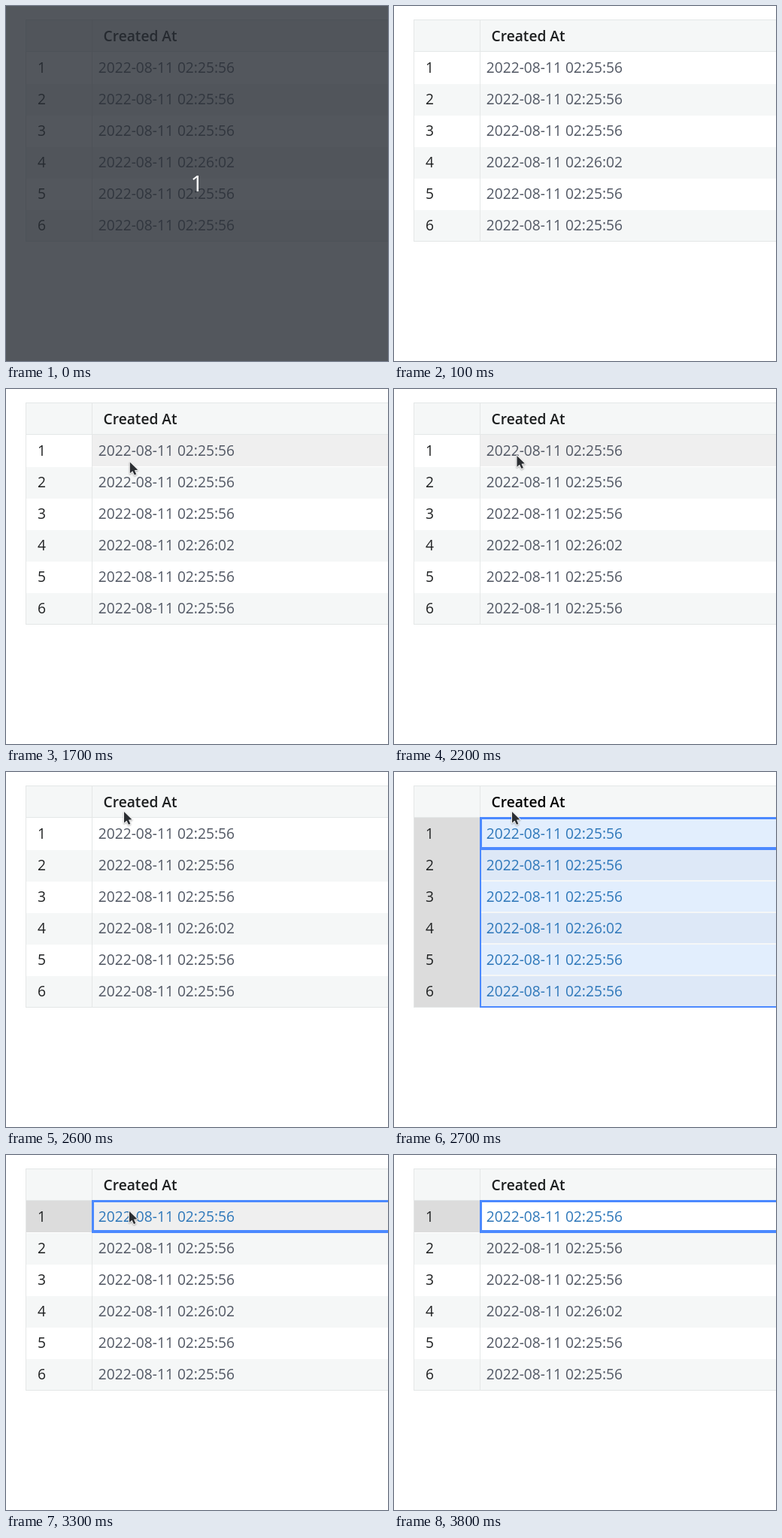
These frames come from a looping animation (508x473 px, 4200 ms). An HTML page with a canvas:

```html
<!DOCTYPE html>
<html lang="en">
<head>
<meta charset="utf-8">
<title>Column selection</title>
<style>
  html, body { margin: 0; width: 100%; height: 100%; overflow: hidden; background: #fff; }
  canvas { display: block; }
</style>
</head>
<body>
<canvas id="stage" width="508" height="473"></canvas>
<script>
const ctx = document.getElementById('stage').getContext('2d');
const W = 508, H = 473, LOOP = 4200, STEP = 100;
const LEFT = 26, COL = 114, TOP = 18, BODY = 62, ROW = 42, ROWS = 6, END = BODY + ROWS * ROW;
const FONT = '"Open Sans", "Noto Sans", sans-serif';
const LINE = '#e4e7e7', STRIPE = '#f5f7f7', BLUE = '#4b89ff';
const ENTER = 500, PICK_COLUMN = 2700, PICK_CELL = 3300, LEAVE = 3800;

// Each move glides the pointer on from where the last one ended
const moves = [
  { from: 500, to: 1000, x: 155, y: 60, pow: 0.5 },
  { from: 1300, to: 1900, x: 171, y: 121, pow: 1.2 },
  { from: 2100, to: 2300, x: 156, y: 57 },
  { from: 2400, to: 2600, x: 157, y: 53 },
  { from: 2700, to: 2800, x: 172, y: 90 },
  { from: 2900, to: 3100, x: 164, y: 75 },
  { from: 3400, to: 3700, x: 192, y: 8 }
];
const arrow = new Path2D('M0 0V14.8L3.5 11.7L6 17L8.4 15.9L6 10.8L10.4 10.3Z');

function pointerAt(t) {
  if (t < ENTER || t >= LEAVE) return null;
  let x = 426, y = 72;
  for (const m of moves) {
    const k = Math.min(1, Math.max(0, (t - m.from) / (m.to - m.from))) ** (m.pow || 1);
    x += (m.x - x) * k;
    y += (m.y - y) * k;
  }
  return { x, y };
}

function box(x, y, w, h, color) {
  ctx.fillStyle = color;
  ctx.fillRect(x, y, w, h);
}

function text(str, x, y, color, weight = 400, size = 19.2) {
  ctx.font = `${weight} ${size}px ${FONT}`;
  ctx.fillStyle = color;
  ctx.fillText(str, x, y);
}

function drawTable(hover, mode) {
  const column = mode === 'column';
  box(0, 0, W, H, '#fff');
  box(LEFT, TOP, W, BODY - TOP - 1, STRIPE);
  for (let i = 0; i < ROWS; i++) {
    const y = BODY + i * ROW, odd = i % 2;
    const chosen = column || (mode === 'cell' && i === 0);
    if (odd) box(LEFT, y, W, ROW, STRIPE);
    if (chosen) box(LEFT, y - 1, COL - LEFT, ROW, '#dcdcdc');
    if (column) box(COL, y, W, ROW, odd ? '#dde8f7' : '#e2eefd');
    if (hover === i) box(COL + 1, y - 1, W, ROW, 'rgba(0,0,0,.062)');
    if (column && i < ROWS - 1) {
      box(LEFT, y + ROW - 1, COL - LEFT, 1, '#e8eaea');
      box(COL, y + ROW - 2, W, 2, STRIPE);
    }
    text(i + 1, 42, y + 27, '#202223');
    text(`2022-08-11 02:${i === 3 ? '26:02' : '25:56'}`, 122.8, y + 27, chosen ? '#2f78ba' : '#535965');
  }
  for (const y of [TOP, BODY - 2, END - 1]) box(LEFT, y, W, 1, LINE);
  for (const x of [LEFT, COL]) box(x, TOP, 1, END - TOP, LINE);
  text('Created At', 129.6, 47, column ? '#000' : '#1d1f20', 600);

  if (column) {
    box(COL, 60, 2, END - 60, BLUE);
    box(COL, END - 2, W, 2, BLUE);
  }
  if (mode) {
    box(COL, 60, W, 3, BLUE);
    box(COL, 60, 3, 44, BLUE);
    box(COL, 100, W, 4, BLUE);
  }
}

function drawPointer({ x, y }) {
  ctx.save();
  ctx.translate(x, y);
  ctx.lineJoin = 'round';
  ctx.lineWidth = 2;
  ctx.strokeStyle = '#f4f4f4';
  ctx.shadowColor = 'rgba(0,0,0,.3)';
  ctx.shadowBlur = 2;
  ctx.shadowOffsetY = 1;
  ctx.stroke(arrow);
  ctx.shadowColor = 'transparent';
  ctx.fillStyle = '#2b2e32';
  ctx.fill(arrow);
  ctx.restore();
}

function drawCountdown() {
  box(0, 0, W, H, 'rgba(40,45,53,.8)');
  text('1', 245.4, 247, '#fff', 400, 30);
}

function draw(now) {
  const t = Math.floor((now % LOOP) / STEP) * STEP;
  const p = pointerAt(t);
  const hover = p && p.y >= BODY ? Math.floor((p.y - BODY) / ROW) : -1;
  drawTable(hover, t >= PICK_CELL ? 'cell' : t >= PICK_COLUMN ? 'column' : '');
  if (p) drawPointer(p);
  if (t < STEP) drawCountdown();
}

const start = performance.now();
function tick() {
  draw(performance.now() - start);
  requestAnimationFrame(tick);
}
tick();
</script>
</body>
</html>
```
